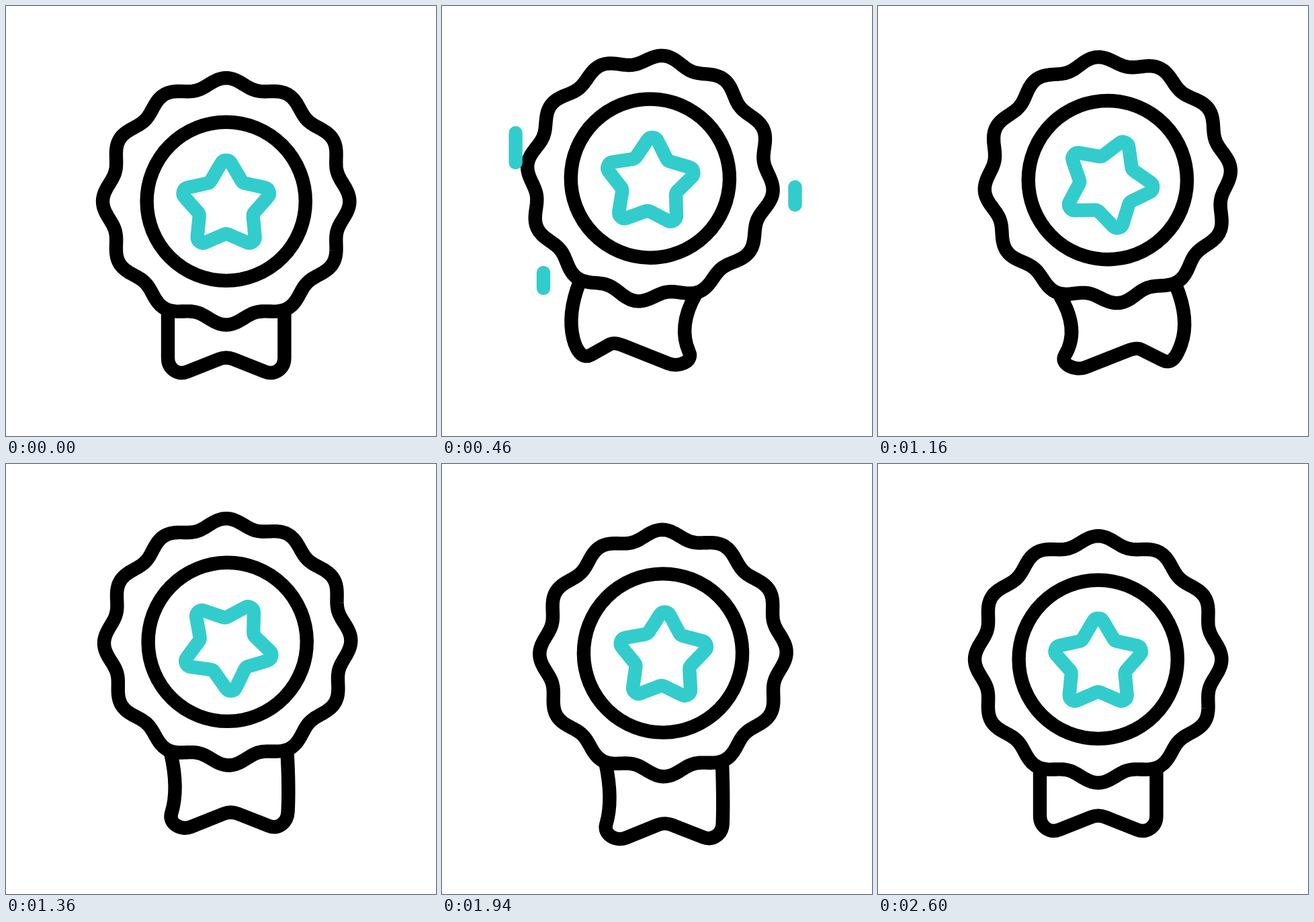
An HTML page with a canvas for the animation above (2.62 s loop, 640 by 640 pixels).

```html
<!DOCTYPE html>
<html lang="en">
<head>
<meta charset="utf-8">
<title>Award rosette</title>
<style>
html, body { margin: 0; width: 100%; height: 100%; overflow: hidden; background: #fff; }
canvas { display: block; width: 640px; height: 640px; }
</style>
</head>
<body>
<canvas id="stage" width="640" height="640"></canvas>
<script>
const ctx = document.getElementById('stage').getContext('2d');
const LOOP = 2620, END = 2600;
const TEAL = '#33cccc', CX = 327.7, CY = 290.8, ARM = 158;
const RAD = Math.PI / 180;

// Key moments as [time, value], eased in between
const LIFT = [[0, 0], [600, -38], [END, 0]];
const SWING = [[0, 0], [580, 7.2], [1120, -5.3], [1600, 3.8], [2120, -2], [END, 0]];
const STRETCH = [[0, 0], [640, 21], [2160, 21], [END, 0]];
const NOTCH_SWAY = [[1160, -4], [1580, -.6]];
// [time, angle, speed]
const SPIN = [[0, 0, 0], [440, -2.8, 0], [860, 56.4, .33], [1580, 308.8, .19], [2000, 364.5, 0], [END, 360, 0]];
// [x, top, bottom] of the speed lines
const LINES = [[109.6, 189, 233], [525.5, 269.5, 296], [151, 397, 420]];

function segment(keys, t) {
  let i = 0;
  while (i < keys.length - 2 && t >= keys[i + 1][0]) i++;
  const a = keys[i], b = keys[i + 1], span = b[0] - a[0];
  return { a, b, span, u: Math.min(1, Math.max(0, (t - a[0]) / span)) };
}

function eased(keys, t) {
  const { a, b, u } = segment(keys, t);
  return a[1] + (b[1] - a[1]) * (1 - Math.cos(Math.PI * u)) / 2;
}

// Cubic through the keys that keeps their speeds
function spin(t) {
  const { a, b, u, span } = segment(SPIN, t), v = 1 - u;
  return v * v * (1 + 2 * u) * a[1] + u * u * (3 - 2 * u) * b[1]
    + span * u * v * (v * a[2] - u * b[2]);
}

const mix = (p, q, f) => [p[0] + (q[0] - p[0]) * f, p[1] + (q[1] - p[1]) * f];

// Point beyond p, heading away from q
function ahead(p, q, len) {
  return mix(p, q, -len / Math.hypot(q[0] - p[0], q[1] - p[1]));
}

function corner(p, pFrom, q, qFrom) {
  const r = .45 * Math.hypot(p[0] - q[0], p[1] - q[1]);
  ctx.bezierCurveTo(...ahead(p, pFrom, r), ...ahead(q, qFrom, r), ...q);
}

// The hem hangs lower while in the air; sides and notch sway against the swing
function drawRibbon(t, swing) {
  const drop = eased(STRETCH, t), sway = -3.3 * swing;
  const notch = [swing * eased(NOTCH_SWAY, t), 230.6 + drop];
  const half = (dir, bulge) => ({
    top: [dir * 86.7, 164],
    bend: [dir * 86.7 + bulge, 199 + drop * .9],
    side: [dir * 86.7, 233 + drop],
    hem: [dir * 57.7, 253.5 + drop]
  });
  const l = half(-1, sway + drop * .45), r = half(1, sway);

  ctx.beginPath();
  ctx.moveTo(...l.top);
  ctx.quadraticCurveTo(...l.bend, ...l.side);
  corner(l.side, l.bend, l.hem, notch);
  ctx.lineTo(...mix(notch, l.hem, .18));
  ctx.quadraticCurveTo(...notch, ...mix(notch, r.hem, .18));
  ctx.lineTo(...r.hem);
  corner(r.hem, notch, r.side, r.bend);
  ctx.quadraticCurveTo(...r.bend, ...r.top);
  ctx.stroke();
}

function drawRosette() {
  ctx.beginPath();
  for (let d = 0; d < 360; d++) {
    const r = 177.3 + 6.4 * Math.cos(12 * d * RAD);
    ctx.lineTo(r * Math.sin(d * RAD), -r * Math.cos(d * RAD));
  }
  ctx.closePath();
  ctx.stroke();
  ctx.beginPath();
  ctx.arc(0, 0, 118.1, 0, 2 * Math.PI);
  ctx.stroke();
}

function drawStar(angle) {
  const at = i => {
    const r = i % 2 ? 41.7 : 75.5, a = i * 36 * RAD;
    return [r * Math.sin(a), -r * Math.cos(a)];
  };
  ctx.save();
  ctx.translate(0, 6);
  ctx.rotate(angle * RAD);
  ctx.strokeStyle = TEAL;
  ctx.beginPath();
  ctx.moveTo(...mix(at(9), at(0), .5));
  for (let i = 0; i < 10; i++) ctx.arcTo(...at(i), ...at(i + 1), 8.7);
  ctx.closePath();
  ctx.stroke();
  ctx.restore();
}

function drawLines(t) {
  if (t <= 200 || t >= 720) return;
  const head = eased([[200, 0], [440, 1]], t);
  const tail = eased([[480, 0], [720, 1]], t);
  ctx.save();
  ctx.strokeStyle = TEAL;
  ctx.lineCap = 'round';
  for (const [x, top, bottom] of LINES) {
    const h = bottom - top;
    ctx.beginPath();
    ctx.moveTo(x, bottom - h * tail);
    ctx.lineTo(x, bottom - h * head);
    ctx.stroke();
  }
  ctx.restore();
}

function draw(t) {
  const swing = eased(SWING, t), rot = swing * RAD;
  ctx.fillStyle = '#fff';
  ctx.fillRect(0, 0, 640, 640);
  ctx.lineWidth = 20.4;
  ctx.lineJoin = 'round';
  ctx.strokeStyle = '#000';
  ctx.save();
  ctx.translate(CX, CY - ARM + eased(LIFT, t));
  ctx.rotate(rot);
  ctx.translate(0, ARM);
  drawRibbon(t, swing);
  drawRosette();
  drawStar(spin(t));
  ctx.restore();
  drawLines(t);
}

const start = performance.now();
function tick() {
  draw((performance.now() - start) % LOOP);
  requestAnimationFrame(tick);
}
tick();
</script>
</body>
</html>
```
